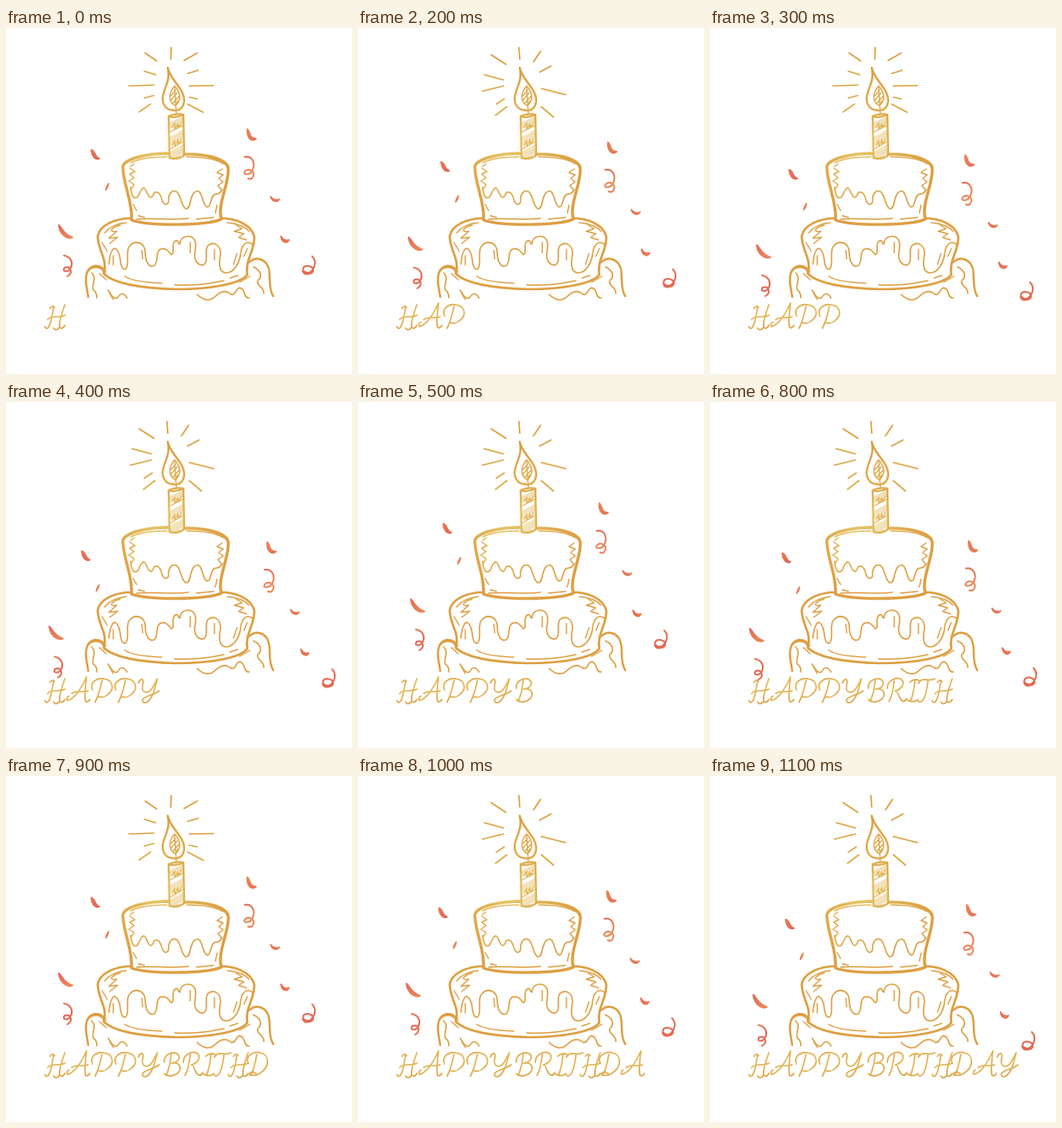
An HTML page for the animation above (1400 ms loop, 400 by 400 pixels).

```html
<!DOCTYPE html>
<html lang="en">
<head>
<meta charset="utf-8">
<title>Birthday cake</title>
<style>
  html, body { margin: 0; width: 100%; height: 100%; overflow: hidden; background: #fff; }
  svg { display: block; width: 100vw; height: 100vh; }
  path { fill: none; stroke-linecap: round; stroke-linejoin: round; }
  #cake path, #rays path { stroke: url(#gold); stroke-width: 1.4; }
  #cake .bold { stroke-width: 3.4; }
  #cake .mid { stroke-width: 2.4; }
  #cake .icing { stroke-width: 1.6; }
  #cake .fill { fill: url(#gold); stroke: none; }
  #rays path { stroke-width: 1.7; }
  #text path { stroke: url(#ink); stroke-width: 1.7; }
  .bits path { stroke: url(#coral); stroke-width: 2; }
  .bits .chip { fill: url(#coral); stroke-width: 1.8; }
</style>
</head>
<body>
<svg viewBox="0 0 400 400">
  <defs>
    <radialGradient id="gold" gradientUnits="userSpaceOnUse" cx="172" cy="132" r="85">
      <stop offset="0" stop-color="#e8cd74"/>
      <stop offset=".4" stop-color="#e0b04e"/>
      <stop offset="1" stop-color="#dd9f42"/>
    </radialGradient>
    <linearGradient id="ink" gradientUnits="userSpaceOnUse" x1="0" y1="318" x2="14" y2="348">
      <stop offset="0" stop-color="#dea348"/>
      <stop offset=".5" stop-color="#e4b958"/>
      <stop offset="1" stop-color="#dca246"/>
    </linearGradient>
    <linearGradient id="coral" gradientUnits="userSpaceOnUse" x1="0" y1="110" x2="9" y2="134" spreadMethod="reflect">
      <stop offset="0" stop-color="#ec8a5a"/>
      <stop offset="1" stop-color="#e26653"/>
    </linearGradient>
  </defs>

  <g id="rays">
    <path d="M161 29L174 38M191 22.500L190.500 36M221 29L206 37.500M160 50L173 54M222 49L210 52.500M142 67L171 66M212 67L240 66.500M160 81L171 78M154 97L167 88M210 88L228 97.500M212 80L221 82"/>
    <path d="M154 31L171 42M186 22.500L187 36M211 27L203 39M223 44L210 51M146 54L168 60M144 73L168 67M160 88L169 82M159 101L172 91M212 70L240 77M212 91L226 103"/>
  </g>

  <g id="cake">
    <!-- flame -->
    <path class="mid" d="M187 46C189 59 206 70 206 83C206 95 197 96 193 95C184 95 179 86 182 76C185 65 190 59 187 46Z"/>
    <path d="M195 67C202 75 203 83 196 90C188 86 187 76 195 67M196 72L191 78M198 75L191 83M200 79L193 87M195 70L197 100M199 84L196 89"/>
    <!-- candle -->
    <path class="fill" opacity=".4" d="M189 109L205 102V108L189 117ZM189 126L206 117V126L189 136ZM189 143L206 134V143L198 150H190Z"/>
    <path d="M192 115L195 110L195 117L199 111L199 116L203 109M192 136L195 130L195 137L199 129L199 135L203 128M190 120L205 112M190 140L205 131"/>
    <path class="mid" d="M188 102Q196 105 205 100L206 147Q198 153 189 150ZM188 102Q196 98 205 100"/>
    <!-- upper tier -->
    <path class="bold" d="M188 145C163 145 136 151 135 161C136 183 147 202 145 222C164 229 231 229 249 221C244 203 258 181 257 162C255 151 229 145 206 146"/>
    <path d="M144 156C153 151 170 149 186 149M209 149C229 149 244 152 251 157M151 221C174 219 190 223 211 220M220 221L240 219M153 217L160 219"/>
    <path d="M143 162L149 166L143 169L148 173L142 177L148 181L145 186M250 163L244 167L251 170L246 174L251 178L245 182L249 187M147 204L151 211M244 205L242 214M148 157L144 160"/>
    <path class="icing" d="M144 184C145 195 149 200 153 194C156 187 159 181 162 188C166 199 169 197 171 191C174 188 178 190 180 198C183 207 189 205 188 196C190 187 196 187 199 191C203 198 203 207 208 209C214 210 212 194 218 190C226 183 227 202 231 206C238 211 235 192 243 192Q247 192 250 187"/>
    <!-- lower tier -->
    <path class="bold" d="M145 220C126 220 108 228 106 241C107 260 118 267 113 284C125 296 160 301 197 302C240 302 272 295 279 285C276 268 288 257 287 241C283 226 264 220 249 220" style="stroke-width:2.7"/>
    <path d="M137 287C147 293 162 294 180 295M195 297C218 298 239 295 252 292M259 289L268 286M114 237C120 229 130 226 139 225M256 225C267 226 276 229 281 235"/>
    <path d="M132 228C120 231 119 237 128 235L119 243L129 242L120 249M266 228L273 232L264 235L275 238L269 242L278 245M111 248L117 258M279 255L275 264"/>
    <path class="icing" d="M119 273C120 260 125 246 131 262C133 270 132 279 138 279C144 274 137 258 143 252C149 245 160 247 161 259C161 270 165 277 171 275C177 271 172 260 178 256C184 253 188 258 191 262C196 262 190 249 196 246C199 244 199 250 201 250C201 242 208 240 213 241C222 244 219 255 218 262C218 270 223 275 228 274C235 271 229 258 233 252C239 246 248 250 248 261C246 273 246 281 253 283C262 284 269 274 271 263C272 250 278 245 285 250"/>
    <path d="M124 263L124 274M157 257L158 267M213 248L213 260M241 256L241 268M267 261L263 273"/>
    <!-- plate cloth -->
    <path class="mid" d="M95 311C94 301 90 291 94 282C100 273 110 275 114 283M281 271C289 263 301 267 304 279C306 290 303 301 309 310"/>
    <path class="fill" d="M93 281C99 270 112 272 117 283C108 276 102 276 93 281Z"/>
    <path class="icing" d="M99 283C106 290 98 297 101 303Q105 305 105 312M118 303C122 310 127 317 131 309C134 306 137 307 140 312M221 308C227 314 235 317 241 311C248 304 254 303 259 307C266 312 266 297 272 301C277 304 275 313 281 312M286 276C296 281 296 288 291 292C289 299 299 299 298 307"/>
    <path d="M108 284L116 291M270 294L282 287M120 307L124 314"/>
  </g>

  <g id="text"></g>

  <g class="bits">
    <path class="chip" d="M98.500 141C103 141 102 149 108 151C103 153 99 148 98.500 141Z"/>
    <path class="chip" d="M118.500 180Q118 184 115.500 187Q116 183 118.500 180Z"/>
    <path class="chip" d="M61 228C65 231 66 239 77 242C70 245 62 238 61 228Z"/>
    <path d="M67 263C74 264 78 270 75 277C71 284 64 281 68 277C75 275 78 283 71 287"/>
  </g>
  <g class="bits">
    <path class="chip" d="M279 117C283 119 280 128 289 128C284 132 278 127 279 117Z"/>
    <path d="M276 149C284 147 289 156 285 164C282 171 273 170 276 166C280 161 288 166 286 171Q284 176 280 174"/>
    <path class="chip" d="M306 195C309 199 313 199 316 198C313 202 308 201 306 195Z"/>
    <path class="chip" d="M318 241C320 245 324 246 327 245C325 250 319 248 318 241Z"/>
    <path d="M354 264C361 271 355 282 349 283C341 283 342 274 349 275C357 276 357 284 350 284Q345 286 343 281"/>
  </g>
</svg>
<script>
// Script capitals, drawn from their left edge on a shared baseline.
const glyphs = {
  H: 'M10 323C8 332 8 340 4 346Q1 349 0 345M23 320C19 331 16 340 17 346Q20 349 23 344M3 337C9 331 16 336 23 332M6 324Q9 320 11 323M17 346Q13 351 10 347',
  A: 'M1 345C10 343 18 329 23 318C22 330 20 339 22 346Q24 348 27 344M6 337C12 333 18 336 25 334M1 345Q-1 341 3 340',
  P: 'M13 322C11 331 9 340 5 347M2 333C-2 324 8 318 15 320C26 321 27 332 21 337C16 342 11 342 8 340',
  D: 'M12 322C10 331 9 339 5 346M2 332C-2 323 9 318 16 320C27 322 26 335 19 341C14 346 8 347 3 345Q5 340 11 344',
  Y: 'M1 325C4 318 8 320 6 327C4 337 12 338 17 331L23 320C20 331 18 342 11 347Q5 349 6 344C9 339 17 340 25 334',
  B: 'M9 322C8 331 7 339 3 346M1 331C0 322 10 318 16 321C22 326 15 332 9 332C21 330 22 341 14 345Q7 349 1 344',
  R: 'M8 322C7 331 6 339 2 346M0 331C0 322 9 318 15 320C22 324 17 332 9 334C14 334 13 347 20 346L22 343',
  I: 'M4 324Q9 319 15 322M10 322C9 331 8 339 5 345M0 344Q6 348 12 345',
  T: 'M0 325C4 317 11 324 19 320M11 322C10 332 9 339 5 345Q1 349 -1 344'
};
const word = 'HAPPYBRITHDAY';
const lefts = [45, 70, 98, 125, 152, 182, 205, 227, 241, 257, 278, 304, 331];
const text = document.getElementById('text');
text.innerHTML = [...word].map((c, i) =>
  `<g transform="translate(${lefts[i]})"><path d="${glyphs[c]}"/></g>`).join('');

// Confetti drift per step: left x, left y, right x, right y.
const drift = [
  [0, 0, 0, 0], [-1, 7, 5, 7], [-2.5, 14, 10, 15], [-7, 23, 16, 30], [-11, 31.5, 23, 45],
  [0, 0, 0, 0], [-2, 10.5, 12.5, 14], [-8, 22, 16, 29], [-15, 34, 20, 43.5],
  [0, 0, 0, 0], [-5, 12, 9, 16], [-11, 25, 18, 32]
];
const letters = [...text.children];
const rays = document.querySelectorAll('#rays path');
const bits = document.querySelectorAll('.bits');
const show = (el, on) => el.setAttribute('visibility', on ? 'visible' : 'hidden');

function draw(now) {
  const step = Math.min(11, Math.floor(now % 1400 / 100));
  const typed = step < 7 ? step + 1 : step + 2;
  letters.forEach((el, i) => show(el, i < typed));
  show(rays[0], step % 3 === 0);
  show(rays[1], step % 3 !== 0);
  const [lx, ly, rx, ry] = drift[step];
  bits[0].setAttribute('transform', `translate(${lx} ${ly})`);
  bits[1].setAttribute('transform', `translate(${rx} ${ry})`);
}

const start = performance.now();
function tick() {
  draw(performance.now() - start);
  requestAnimationFrame(tick);
}
tick();
</script>
</body>
</html>
```
